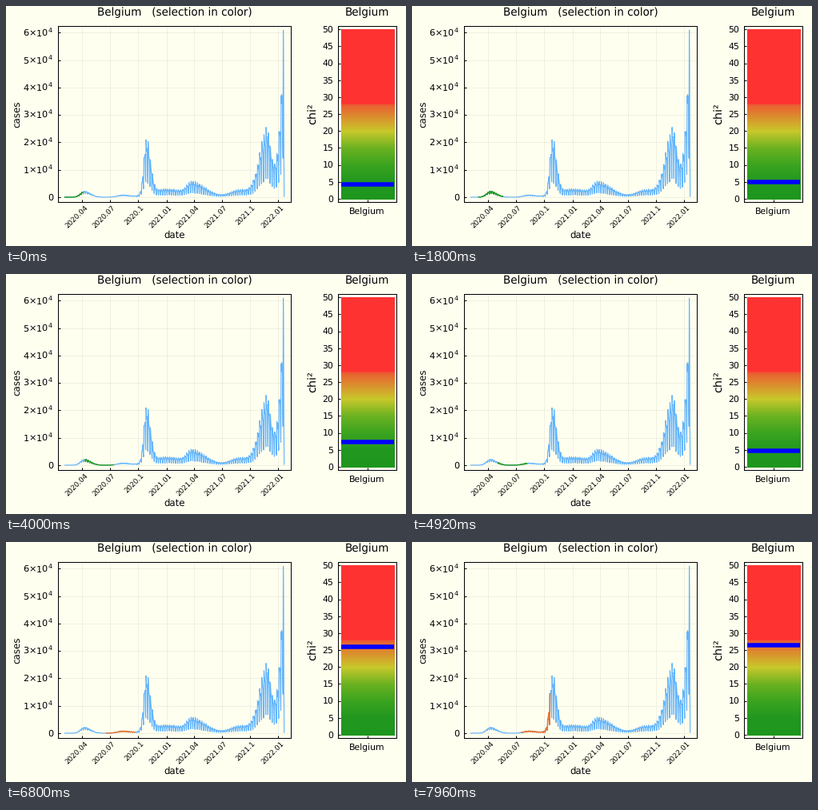
Animation of 500x300 px, one loop 8000 ms. Source, as a matplotlib script:

```python
import numpy as np
import matplotlib.pyplot as plt
from matplotlib.animation import FuncAnimation
from matplotlib.colors import LinearSegmentedColormap

W, H, DPI = 500, 300, 100
FRAMES, INTERVAL = 200, 40
PAPER, BLUE = "#fffff0", "#64b4fb"
PX = 72 / DPI            # points per pixel
DAY = 0.383              # pixels per day
X0 = 73.5                # pixel of the first day
CASES_PX = 291.6         # cases per pixel
CHI_PX = 4.23            # pixels per unit of chi squared
SPAN = 93                # days in the moving window
FIRST_DAY = np.datetime64("2020-02-04")

plt.rcParams.update({
    "font.family": "DejaVu Sans", "mathtext.fontset": "dejavusans",
    "text.hinting": "none"})

heat = LinearSegmentedColormap.from_list("heat", [
    (0.00, "#1e961e"), (0.10, "#229820"), (0.20, "#3ca41f"),
    (0.30, "#6cb222"), (0.40, "#c8c82a"), (0.555, "#eb5f32"),
    (0.565, "#ff3232"), (1.00, "#ff3232")])


def wave(t, peak, height, rise, fall):
    """Bell curve with its own width on each side of the peak."""
    width = np.where(t < peak, rise, fall)
    return height * np.exp(-0.5 * ((t - peak) / width) ** 2)


def make_cases():
    """Epidemic waves, an exponential finish and a weekly rhythm."""
    days = np.arange(26, 714)
    env = (wave(days, 64, 2300, 13, 20) + wave(days, 189, 800, 18, 20)
           + wave(days, 266, 21000, 8.5, 13) + wave(days, 330, 3200, 50, 60)
           + wave(days, 417, 5000, 18, 45) + wave(days, 573, 2900, 32, 40)
           + wave(days, 659, 24000, 24, 13)
           + 60900 * np.exp((days - 713) / 15))
    week = np.array([0.93, 0.86, 0.84, 0.80, 0.42, 0.27, 1.0])[days % 7]
    depth = np.where(days < 235, 0.55, 1.0)
    noise = 1 - 0.14 * np.random.default_rng(4).random(days.size)
    noise[days % 7 == 6] **= 0.5
    noise[-1] = 1
    cases = env * (1 - depth * (1 - week)) * noise
    return np.r_[0, days, 714:717], np.r_[0, cases, 47000, 14500, 300]


def chi_at(i):
    climb = 22.1 / (1 + np.exp((141.5 - i) / 5.5))
    return (3.9 + climb + wave(i, 21, 7.2, 8, 12) + wave(i, 84, 6.4, 7, 14)
            + wave(i, 159, 2.8, 4, 4) + wave(i, 194, 2.2, 3, 3))


fig = plt.figure(figsize=(W / DPI, H / DPI), dpi=DPI, facecolor=PAPER)


def put(x, y, s, size, **kw):
    fig.text(x / W, 1 - y / H, s, fontsize=size * PX, **kw)


def panel(left, right, top, bottom, x_scale, y_scale, xticks, yticks):
    """Axes in pixels; each scale is (pixel of zero, units per pixel)."""
    ax = fig.add_axes([left / W, 1 - bottom / H,
                       (right - left) / W, (bottom - top) / H],
                      facecolor=PAPER)
    (x0, ux), (y0, uy) = x_scale, y_scale
    ax.set(xlim=((left - x0) * ux, (right - x0) * ux),
           ylim=((y0 - bottom) * uy, (y0 - top) * uy),
           xticks=xticks, yticks=yticks)
    ax.tick_params(direction="in", length=3 * PX, width=PX,
                   labelbottom=False, labelleft=False)
    ax.grid(color="black", alpha=0.08, linewidth=0.7 * PX)
    ax.set_axisbelow(True)
    for side in ax.spines.values():
        side.set_linewidth(PX)
    return ax


# Left panel: the case curve
months = np.arange("2020-04", "2022-02", 3, dtype="datetime64[M]")
month_days = (months.astype("datetime64[D]") - FIRST_DAY).astype(int)
steps = np.arange(7)
cases_ax = panel(65.25, 356.25, 24.75, 244.75, (X0, 1 / DAY), (239, CASES_PX),
                 month_days, steps * 1e4)

for month, d in zip(months, month_days):
    name = str(month).replace("-", ".").rstrip("0")
    shift = 7.5 if len(name) == 7 else 5.5
    put(X0 + d * DAY - shift, 256 + shift, name, 8.8, rotation=45,
        ha="center", va="center")
for k in steps:
    label = rf"${k}{{\times}}10^4$" if k else "0"
    put(59, 243 - k * 1e4 / CASES_PX, label, 11.2, ha="right")

put(210.5, 12.5, "Belgium   (selection in color)", 13.5, ha="center")
put(210.5, 289.5, "date", 11.7, ha="center")
put(20, 135, "cases", 11.9, rotation=90, ha="right", va="center")

days, cases = make_cases()
cases_ax.plot(days, cases, color=BLUE, linewidth=1.15 * PX)
chosen, = cases_ax.plot([], [], linewidth=1.4 * PX)

# Right panel: the chi-squared gauge
chi_ax = panel(415.25, 488.25, 24.75, 244.75, (0, 1), (240.8, 1 / CHI_PX),
               [452], np.arange(0, 51, 5))
chi_ax.imshow(np.linspace(0, 50, 101)[:, None], cmap=heat, vmin=0, vmax=50,
              extent=(419, 485.3, -0.2, 50), origin="lower", aspect="auto",
              zorder=1.5)
for v in range(0, 51, 5):
    put(409.5, 244.5 - v * CHI_PX, str(v), 10.9, ha="right")

put(451.5, 12.5, "Belgium", 13.5, ha="center")
put(451.5, 260, "Belgium", 10.9, ha="center")
put(389.5, 135, "chi²", 14.4, rotation=90, ha="right", va="center")

marker, = chi_ax.plot([419, 485.3], [0, 0], color="#0000ff",
                      linewidth=5.5 * PX, solid_capstyle="butt", zorder=3)


def draw(i):
    last = 59 + i
    inside = (days >= last - SPAN) & (days <= last)
    chi = chi_at(i)
    chosen.set_data(days[inside], cases[inside])
    chosen.set_color(heat(chi / 50))
    marker.set_ydata([chi, chi])
    return chosen, marker


anim = FuncAnimation(fig, draw, frames=FRAMES, interval=INTERVAL,
                     repeat=True, repeat_delay=0)
plt.show()
```
